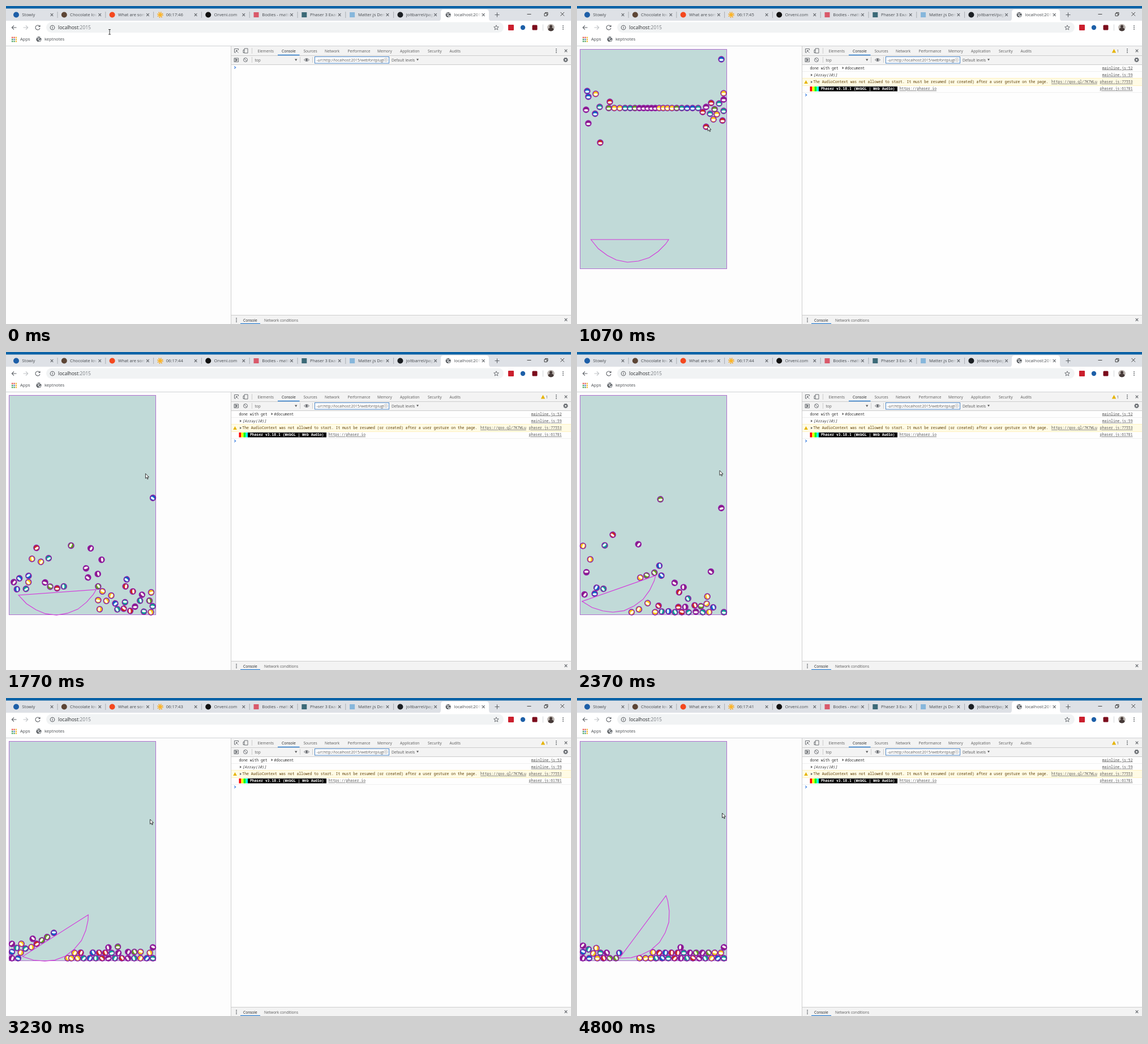
An HTML page with a canvas for the animation above (4830 ms loop, 998 px wide and 561 px high).

```html
<!DOCTYPE html>
<html lang="en">
<head>
<meta charset="utf-8">
<title>Falling balls</title>
<style>
  html, body { margin: 0; width: 100%; height: 100%; overflow: hidden; background: #fdfdfd; }
  svg, canvas { display: block; }
  #ui, #game { position: absolute; left: 0; top: 0; width: 998px; height: 561px; }
  text { font-family: "Open Sans", "Noto Sans", sans-serif; white-space: pre; }
  .tab { font-size: 7.6px; fill: #45494d; }
  .dev { font-size: 6.6px; fill: #5a5a5a; }
  .mono { font-family: "Noto Sans Mono", "Liberation Mono", monospace; font-size: 6.42px; fill: #303030; }
  .link { text-decoration: underline; fill: #545454; }
  .warn { fill: #5c3c00; }
  .end { text-anchor: end; }
  .ico { fill: none; stroke: #5f6368; stroke-width: 1.1; }
</style>
</head>
<body>
<svg id="ui" viewBox="0 0 998 561">
  <defs>
    <linearGradient id="fadeTab"><stop stop-color="#dee1e6" stop-opacity="0"/><stop offset="1" stop-color="#dee1e6"/></linearGradient>
    <linearGradient id="fadeOn"><stop stop-color="#fff" stop-opacity="0"/><stop offset="1" stop-color="#fff"/></linearGradient>
    <g id="globe">
      <circle r="4.6" fill="#54585c"/>
      <path d="M-3.4-1.6q2-2 3.4-.6t-1 2.2 1.4 1.6-.8 2.2M1.4-3.6q1 1.6 2.6 1.4M2 1.2h2" fill="none" stroke="#e8eaed" stroke-width="1.1"/>
    </g>
    <path id="x" d="M-2.3-2.3l4.6 4.6M2.3-2.3l-4.6 4.6" class="ico"/>
    <g id="dots" fill="#5f6368"><circle cy="-3" r=".9"/><circle r=".9"/><circle cy="3" r=".9"/></g>
  </defs>

  <rect width="998" height="561" fill="#fdfdfd"/>
  <rect width="998" height="5" fill="#0b62a6"/>
  <rect y="4.5" width="998" height="22" fill="#dee1e6"/>
  <path d="M763 26.5q5 0 5-5V11q0-5 5-5h75q5 0 5 5v10.500q0 5 5 5z" fill="#fff"/>
  <g id="tabs"></g>
  <path d="M863.500 15.500h8M867.500 11.500v8" class="ico"/>
  <path d="M920.500 14.500h7M951 13h4.500v4.500h-4.500zM952.500 13v-1.500h4.500V16h-1.500M979.500 11l6.500 6.500M986 11l-6.500 6.500" class="ico" style="stroke:#333;stroke-width:.9"/>

  <rect y="26" width="998" height="44" fill="#fff"/>
  <rect x="71" y="28.500" width="808" height="18.500" rx="9.250" fill="#f1f3f4"/>
  <path d="M18.500 38h-8M14 34.300l-3.700 3.700 3.700 3.700" class="ico"/>
  <path d="M30.500 38h8M35 34.300l3.700 3.700-3.700 3.700" class="ico" style="stroke:#bfc2c5"/>
  <path d="M59.300 35.700a4 4 0 1 0 .6 3.300M60 33.800v2.700h-2.700" class="ico"/>
  <g class="ico"><circle cx="82" cy="38" r="3.800"/><path d="M82 37.300v2.600M82 35.700v1"/></g>
  <text x="92" y="41" font-size="8.6" fill="#25282b">localhost<tspan fill="#777b80">:2015</tspan></text>
  <path d="M866 33.800l1.200 2.900 3.100.2-2.400 2 .8 3-2.700-1.700-2.700 1.700.8-3-2.400-2 3.100-.2z" class="ico" style="stroke-width:.9"/>
  <rect x="887" y="33" width="10" height="10" rx="1" fill="#cb1f2d"/>
  <circle cx="913" cy="38" r="4.200" fill="#1d5fa8"/>
  <rect x="929.500" y="33.500" width="9" height="9" rx="1.500" fill="#7c0d1c"/>
  <path d="M948.500 32.500v11" stroke="#d4d6d9"/>
  <circle cx="962.500" cy="38" r="6.300" fill="#b9b2ad"/>
  <path d="M957.500 42a5 4 0 0 1 10 0 6.300 6.300 0 0 1-10 0z" fill="#463a38"/><circle cx="962.500" cy="36" r="2.500" fill="#463a38"/>
  <use href="#dots" x="984" y="38"/>
  <g id="apps"></g>
  <text x="25" y="61.400" class="tab">Apps</text>
  <use href="#globe" x="58" y="58.700"/>
  <text x="68" y="61.400" class="tab">keptnotes</text>
  <path d="M0 70.500h998" stroke="#cfd1d4"/>

  <rect x="398" y="71" width="600" height="32" fill="#f3f3f3"/>
  <rect x="398" y="103" width="600" height="443" fill="#fefefe"/>
  <rect x="398" y="546" width="600" height="15" fill="#f3f3f3"/>
  <path d="M397.500 71v490M398 87.500h600M398 103.500h600M398 545.500h600M434.500 74v10M434.500 90v10M519.500 90v10M541.500 90v10" fill="none" stroke="#cdcdcd"/>
  <path d="M480 86.500h38.500M414 560.500h35" stroke="#2f7fd0" stroke-width="1.300"/>
  <g class="ico" style="stroke-width:.9">
    <path d="M406 82h-2.500v-6.500h7v2.500M406.500 78.500l4 4M406.500 81v-2.500h2.500"/>
    <path d="M419 82.500v-5h2M421 75h6v8h-6zM419 82.500h2"/>
    <path d="M403 92h7.500v6.500h-7.500zM405 92v6.500"/><path d="M406.500 93.500l2.500 1.700-2.500 1.700z" fill="#5f6368"/>
    <circle cx="423" cy="95" r="3.500"/><path d="M420.600 92.600l4.800 4.800"/>
    <path d="M526.500 95q4.500-5 9 0-4.500 5-9 0z"/><circle cx="531" cy="95" r="1.400" fill="#5f6368"/>
    <circle cx="988.500" cy="95" r="2.500" style="stroke-width:1.800"/><circle cx="988.500" cy="95" r="3.900" stroke-dasharray="1.500 1.560"/>
  </g>
  <path d="M510 93.500h4.400l-2.200 3.400zM725 93.200h4l-2 3.200z" fill="#5a5a5a"/>
  <rect x="545.500" y="89.500" width="131" height="11.500" fill="#fff" stroke="#4a86c8"/>
  <circle cx="671" cy="95" r="3" fill="none" stroke="#aaa" stroke-width=".8"/><path d="M670 94l2 2M672 94l-2 2" stroke="#999" stroke-width=".7"/>
  <svg x="546" y="89" width="121" height="12"><text x="2.500" y="8.700" class="dev">-url:http://localhost:2015/webfontplugin</text></svg>
  <use href="#dots" x="972" y="79"/><use href="#dots" x="407" y="554"/>
  <use href="#x" x="989" y="79"/><use href="#x" x="989" y="553.500"/>
  <g id="labels"></g>

  <g id="log" visibility="hidden">
    <path d="M948.500 75.800l3.700 6.700h-7.400z" fill="#e6b400"/><text x="953.500" y="82" class="dev">1</text>
    <rect x="398" y="128" width="600" height="12" fill="#fffbe5"/>
    <path d="M398 115.500h600M398 152.500h600" stroke="#efefef"/>
    <path d="M398 127.500h600M398 140.500h600" stroke="#fff1bf"/>
    <path d="M468.500 107l3.200 2.200-3.200 2.200zM413 119.600l3.200 2.200-3.200 2.200zM413 131.900l3.200 2.200-3.200 2.200z" fill="#6a6a6a"/>
    <path d="M404.500 131l3.300 6h-6.600z" fill="#e6b400"/>
    <g class="mono">
      <text x="411.500" y="111.500" class="mono">done with get</text><text x="473.500" y="111.500" class="mono">#document</text>
      <text x="417.500" y="124" class="mono" font-style="italic">[Array(10)]</text>
      <text x="417.300" y="136.400" class="mono warn">The AudioContext was not allowed to start. It must be resumed (or created) after a user gesture on the page.</text>
      <text x="838" y="136.400" class="mono link">https://goo.gl/7K7WLu</text>
    </g>
    <rect x="411.500" y="142" width="4" height="8.500" fill="#f00"/><rect x="415.500" y="142" width="4" height="8.500" fill="#ff0"/>
    <rect x="419.500" y="142" width="4" height="8.500" fill="#0f0"/><rect x="423.500" y="142" width="4" height="8.500" fill="#0ff"/>
    <rect x="427" y="142" width="139" height="8.500" fill="#000"/>
    <text x="431" y="148.400" class="mono" font-weight="700" style="fill:#fff">Phaser v3.18.1 (WebGL | Web Audio)</text>
    <text x="569.700" y="148.400" class="mono link">https://phaser.io</text>
    <g id="sources"></g>
  </g>
  <path id="prompt" d="M403.300 106.500l2.400 2-2.400 2" fill="none" stroke="#3a7ee0" stroke-width="1.100"/>
</svg>
<canvas id="game" width="998" height="561"></canvas>

<script>
const $ = id => document.getElementById(id);

// Browser chrome
const tabs = [
  ['Stowly', '#1d5fa8'], ['Chocolate lover', '#5d4636'], ['What are some', '#f4481e'],
  ['06:17:46', 'sun'], ['Orveni.com', '#111'], ['Bodies - matter', '#d9596b', 1],
  ['Phaser 3 Examp', '#3c6a78', 1], ['Matter.js Demo', '#86b6dc', 1],
  ['joltbarrel/page', '#1b1f23'], ['localhost:2015', 'globe']
];
const favicon = (x, kind, square) => {
  if (kind === 'globe') return `<use href="#globe" x="${x}" y="15.500"/>`;
  if (kind === 'sun') return `<circle cx="${x}" cy="15.500" r="4.500" fill="none" stroke="#f5a623" stroke-width="1.800" stroke-dasharray="1.700 1.830"/><circle cx="${x}" cy="15.500" r="3.200" fill="#fbb62c"/>`;
  return square
    ? `<rect x="${x - 4.5}" y="11" width="9" height="9" fill="${kind}"/>`
    : `<circle cx="${x}" cy="15.500" r="5" fill="${kind}"/>`;
};
$('tabs').innerHTML = tabs.map(([name, kind, square], i) => {
  const x = 84.8 * i, on = i === tabs.length - 1;
  return favicon(18 + x, kind, square) +
    `<svg x="${28.3 + x}" y="6" width="48" height="19">
      <text ${i === 3 ? 'id="clock"' : ''} y="12.300" class="tab">${name}</text>
      <rect x="38" width="10" height="19" fill="url(#${on ? 'fadeOn' : 'fadeTab'})"/></svg>` +
    `<use href="#x" x="${81 + 84.7 * i}" y="15.500"/>` +
    (i < 8 ? `<path d="M${91 + x} 10v11" stroke="#a9adb3"/>` : '');
}).join('');

const appHues = ['#e2483d', '#e2483d', '#f0b429', '#3b9a52', '#3c78d8', '#f0b429', '#3b9a52', '#3b9a52', '#f0b429'];
$('apps').innerHTML = appHues.map((c, i) =>
  `<rect x="${10 + i % 3 * 3.4}" y="${54.500 + (i / 3 | 0) * 3.4}" width="2.200" height="2.200" fill="${c}"/>`).join('');

const label = (x, y, s, dark) => `<text x="${x}" y="${y}" class="dev"${dark ? ' style="fill:#222"' : ''}>${s}</text>`;
$('labels').innerHTML = label(444.5, 82, 'Elements') + label(487, 82, 'Console', 1) + label(525.5, 82, 'Sources') +
  label(563, 82, 'Network') + label(603.5, 82, 'Performance') + label(656, 82, 'Memory') +
  label(696, 82, 'Application') + label(745, 82, 'Security') + label(783.5, 82, 'Audits') +
  label(439.5, 97.6, 'top') + label(681, 97.6, 'Default levels') +
  label(419, 556.8, 'Console', 1) + label(456, 556.8, 'Network conditions');
$('sources').innerHTML = ['mainline.js:52', 'mainline.js:59', 'phaser.js:77553', 'phaser.js:61781']
  .map((s, i) => `<text x="981.500" y="${111.500 + 12.3 * i}" class="mono link end">${s}</text>`).join('');

// Timing, in ms
const LOOP = 4830, STEP = 100 / 3, FRAMES = 145;
const DROP = 500, SPREAD = 32 * STEP, FALL = (SPREAD - DROP) / 1000;
const LOG_AT = 300, STAGE_AT = 430;

const clamp = (v, lo, hi) => Math.min(hi, Math.max(lo, v));
const track = (keys, t) => {
  let i = 1;
  while (i < keys.length - 1 && keys[i][0] < t) i++;
  const a = keys[i - 1], b = keys[i], u = clamp((t - a[0]) / (b[0] - a[0]), 0, 1);
  return a.map((v, j) => v + (b[j] - v) * u).slice(1);
};

// Bowl: left corner and tilt in degrees
const bowlKeys = [
  [1067, 24.5, 412, 0], [1103, 24.5, 423.5, 0], [1500, 24, 424.5, -1], [1770, 22, 429, -4.1],
  [2370, 9, 440, -19.4], [3230, 29, 456, -32.3], [4030, 60, 462, -47.7], [4800, 75, 459, -53.3]
];
const bowlShape = [[0, 0], [13, 16], [29, 28], [45, 36], [64.5, 40], [84, 38], [103, 32], [119, 21], [132, 8], [137.5, 0]];
const bowlAt = t => {
  const [x, y, deg] = track(bowlKeys, t), s = (t - DROP) / (SPREAD - DROP);
  return { x, y: t < SPREAD ? 318 + 94 * s * s : y, a: deg * Math.PI / 180 };
};
const edges = bowlShape.map((p, i) => {
  const q = bowlShape[(i + 1) % bowlShape.length], dx = q[0] - p[0], dy = q[1] - p[1], len = Math.hypot(dx, dy);
  return { p, q, len, tx: dx / len, ty: dy / len, nx: -dy / len, ny: dx / len };
});

const cursorKeys = [
  [0, 183, 46], [300, 183, 46], [900, 228, 205], [1070, 231, 212], [1770, 246.5, 214.5],
  [2370, 252, 209], [3230, 254.5, 214], [4030, 256, 206.5], [4800, 256.5, 203]
];

// Balls: a straight row with both ends scattered
const hues = { b: '#0b62c4', y: '#f7c51c', p: '#8a1a88', t: '#0c9c96', r: '#c62a22', g: '#639c22' };
const R = 5.5, BOX = { l: 5, r: 265, t: 77, b: 464.5 };
const scattered = [
  [18, 150, 'b'], [20, 160, 'b'], [33, 155, 'y'], [16, 183, 'p'], [40, 178, 't'], [32, 190, 'b'],
  [58, 169, 'r'], [20, 207, 'p'], [41, 241, 'r'], [222, 187, 'r'], [228, 178, 'p'], [237, 171, 'r'],
  [251, 172, 't'], [243, 182, 'g'], [235, 190, 't'], [247, 191, 'y'], [241, 200, 'y'], [257, 202, 'r'],
  [259, 185, 't'], [259, 165, 'p'], [259, 154, 'y'], [228, 213, 'r'], [255, 94, 'b']
];
const row = [...'gyyttgpppppyyyygtbbt'].map((c, i, all) => {
  const u = i / (all.length - 1);
  return [56 + 158 * (u + 0.03 * Math.sin(2 * Math.PI * u)), 180, c];
});
const balls = [...row, ...scattered].sort((a, b) => a[0] - b[0]).map(([x, y, c], i, all) => {
  const x0 = 11 + 248 * i / (all.length - 1);
  return { x, y, x0, x1: x, y1: y, c: hues[c], a: 0, vx: (x - x0) / FALL, vy: 2 * (y - 86) / FALL };
});

const bounce = (b, nx, ny, e) => {
  const vn = b.vx * nx + b.vy * ny;
  if (vn >= 0) return;
  const k = (vn < -35 ? 1 + e : 1) * vn;
  b.vx -= k * nx;
  b.vy -= k * ny;
};

function hitBowl(b, bowl, e) {
  const c = Math.cos(bowl.a), s = Math.sin(bowl.a), dx = b.x - bowl.x, dy = b.y - bowl.y;
  const lx = dx * c + dy * s, ly = dy * c - dx * s;
  let d = -1e9, edge;
  for (const g of edges) {
    const h = (lx - g.p[0]) * g.nx + (ly - g.p[1]) * g.ny;
    if (h > d) { d = h; edge = g; }
  }
  if (d >= R) return;
  let { nx, ny } = edge;
  const u = (lx - edge.p[0]) * edge.tx + (ly - edge.p[1]) * edge.ty;
  if (d > 0 && (u < 0 || u > edge.len)) {
    const v = u < 0 ? edge.p : edge.q;
    d = Math.hypot(lx - v[0], ly - v[1]);
    if (d >= R) return;
    nx = (lx - v[0]) / d;
    ny = (ly - v[1]) / d;
  }
  const wx = nx * c - ny * s, wy = nx * s + ny * c, push = Math.min(R - d, 1);
  b.x += wx * push;
  b.y += wy * push;
  bounce(b, wx, wy, e);
}

function hitBall(a, b, e) {
  const dx = b.x - a.x, dy = b.y - a.y, d = Math.hypot(dx, dy);
  if (d >= 2 * R || d === 0) return;
  const nx = dx / d, ny = dy / d, push = Math.min((2 * R - d) / 2, 0.15);
  a.x -= nx * push; a.y -= ny * push;
  b.x += nx * push; b.y += ny * push;
  const vn = (b.vx - a.vx) * nx + (b.vy - a.vy) * ny;
  if (vn >= 0) return;
  const k = (vn < -35 ? 1 + e : 1) * vn / 2;
  a.vx += k * nx; a.vy += k * ny;
  b.vx -= k * nx; b.vy -= k * ny;
}

function hitWalls(b, e) {
  if (b.x < BOX.l + R) { b.x = BOX.l + R; bounce(b, 1, 0, e); }
  if (b.x > BOX.r - R) { b.x = BOX.r - R; bounce(b, -1, 0, e); }
  if (b.y < BOX.t + R) { b.y = BOX.t + R; bounce(b, 0, 1, e); }
  if (b.y > BOX.b - R) { b.y = BOX.b - R; bounce(b, 0, -1, e); b.vx *= 0.996; }
}

function advance(t, dt) {
  const bowl = bowlAt(t), e = clamp(0.8 - 0.45 * (t / 1000 - 1.77), 0.1, 0.8);
  const drag = 1 - (t > 3000 ? 1.5 : 0.1) * dt;
  for (const b of balls) {
    b.vy += 600 * dt;
    b.vx *= drag; b.vy *= drag;
    b.x += b.vx * dt; b.y += b.vy * dt;
    b.a += b.vx / R * dt * 0.7;
  }
  for (let pass = 0; pass < 3; pass++) {
    for (let i = 0; i < balls.length; i++)
      for (let j = i + 1; j < balls.length; j++) hitBall(balls[i], balls[j], e * 0.85);
    for (const b of balls) { hitBowl(b, bowl, e); hitWalls(b, e); }
  }
}

// Every pose is worked out once, then looked up by time
const poses = [];
for (let k = 0; k < FRAMES; k++) {
  const t = k * STEP;
  if (t <= SPREAD + 1) {
    const s = clamp((t - DROP) / (SPREAD - DROP), 0, 1);
    poses.push(balls.map(b => ({ x: b.x0 + (b.x1 - b.x0) * s, y: 86 + (b.y1 - 86) * s * s, a: 0 })));
  } else {
    for (let i = 1; i <= 10; i++) advance(t - STEP + i * STEP / 10, STEP / 10000);
    poses.push(balls.map(({ x, y, a }) => ({ x, y, a })));
  }
}

const ctx = $('game').getContext('2d');

function drawBall({ x, y, a }, color) {
  ctx.save();
  ctx.translate(x, y);
  ctx.rotate(a);
  ctx.beginPath();
  ctx.arc(0, 0, 5, 0, 7);
  ctx.fillStyle = color;
  ctx.fill();
  ctx.strokeStyle = '#8f1aa6';
  ctx.lineWidth = 1.5;
  ctx.stroke();
  ctx.beginPath();
  ctx.ellipse(0, 0.9, 3.6, 2, 0, 0, 7);
  ctx.fillStyle = 'rgba(255,255,255,.92)';
  ctx.fill();
  ctx.restore();
}

function drawBowl(t) {
  const { x, y, a } = bowlAt(t);
  ctx.save();
  ctx.translate(x, y);
  ctx.rotate(a);
  ctx.beginPath();
  bowlShape.forEach(p => ctx.lineTo(...p));
  ctx.closePath();
  ctx.strokeStyle = '#d436dc';
  ctx.lineWidth = 1.1;
  ctx.stroke();
  ctx.restore();
}

const arrow = new Path2D('M0 0V8.500L2 6.700 3.400 9.800 4.700 9.200 3.400 6.200H6z');
const beam = new Path2D('M-2-4.500H2M0-4.500V4M-2 4H2');
function drawCursor(t) {
  const [x, y] = track(cursorKeys, t);
  ctx.save();
  ctx.translate(x, y);
  ctx.lineWidth = 0.9;
  ctx.strokeStyle = '#222';
  if (y < 70) ctx.stroke(beam);
  else {
    ctx.fillStyle = '#fff';
    ctx.fill(arrow);
    ctx.stroke(arrow);
  }
  ctx.restore();
}

function draw(k) {
  const t = k * STEP, logged = t >= LOG_AT;
  $('clock').textContent = '06:17:' + (46 - Math.floor((t + 520) / 1000));
  $('log').setAttribute('visibility', logged ? 'visible' : 'hidden');
  $('prompt').setAttribute('transform', `translate(0 ${logged ? 48.5 : 0})`);
  ctx.clearRect(0, 0, 998, 561);
  if (t >= STAGE_AT) {
    ctx.fillStyle = '#c1dad8';
    ctx.fillRect(5, 76, 260, 388);
    ctx.strokeStyle = '#b070d0';
    ctx.lineWidth = 1;
    ctx.strokeRect(5.5, 76.5, 259, 387);
  }
  if (t >= DROP - 1) {
    poses[k].forEach((p, i) => drawBall(p, balls[i].c));
    drawBowl(t);
  }
  drawCursor(t);
}

const start = performance.now();
let shown = -1;
function tick() {
  const t = (performance.now() - start) % LOOP;
  const k = Math.min(FRAMES - 1, Math.floor((t + 4) / STEP));
  if (k !== shown) draw(shown = k);
  requestAnimationFrame(tick);
}
tick();
</script>
</body>
</html>
```
